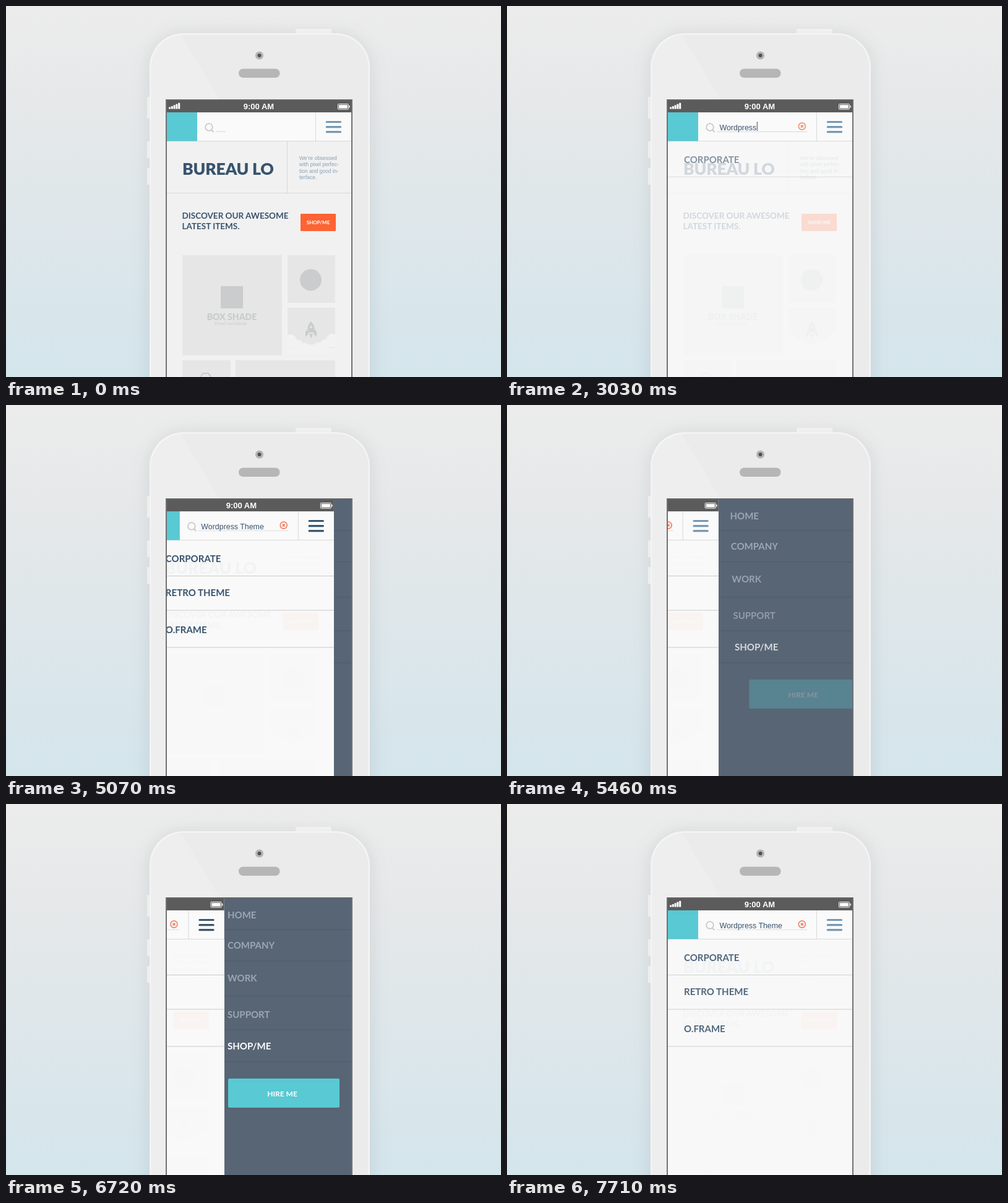
Animation, 800 px wide and 600 px high, one loop 7740 ms. Source, as an HTML page:

```html
<!DOCTYPE html>
<html lang="en">
<head>
<meta charset="utf-8">
<title>Mobile search and menu</title>
<style>
  html, body { margin: 0; width: 100%; height: 100%; overflow: hidden; }
  svg { display: block; width: 800px; height: 600px; }
  text { font-family: Lato, sans-serif; font-weight: 700; fill: #38536d; }
  .sans { font-family: "Liberation Sans", Arial, sans-serif; font-weight: 400; }
  .mid { text-anchor: middle; }
  .phone { filter: drop-shadow(0 2px 14px rgba(60, 70, 80, .13)); }
  .rule { stroke: #d9d9d9; }
  .tile { fill: #e6e6e6; }
  .mark { fill: #cacccd; }
  .title { font-size: 26.5px; font-weight: 900; letter-spacing: -.2px; }
  .lead { font-size: 13.5px; }
  .note { font-size: 8.5px; fill: #87a0b5; }
  .row text { font-size: 15px; }
  .row path { stroke: #c9cacb; }
  .item { font-size: 15px; fill: #9ba6b2; }
  .active { fill: #fff; }
  #line { transform-origin: 339px 0; }
  #bars { stroke: #7599b3; stroke-width: 3.2; stroke-linecap: round; }
</style>
</head>
<body>
<svg viewBox="0 0 800 600">
  <defs>
    <linearGradient id="sky" x2="0" y2="1">
      <stop stop-color="#ececec"/>
      <stop offset=".3" stop-color="#e5e8e9"/>
      <stop offset="1" stop-color="#d4e5ec"/>
    </linearGradient>
    <clipPath id="screen"><path d="M260 153h298v447H260z"/></clipPath>
    <clipPath id="sky-tile"><path d="M455 488h77v77h-77z"/></clipPath>
  </defs>

  <rect width="800" height="600" fill="url(#sky)"/>

  <g fill="#f8f8f8">
    <rect x="228" y="147" width="8" height="35" rx="1"/>
    <rect x="228" y="219" width="8" height="27" rx="1"/>
    <rect x="228" y="262" width="8" height="27" rx="1"/>
    <rect x="468" y="37" width="58" height="12" rx="3"/>
  </g>
  <rect class="phone" x="232" y="44" width="356" height="640" rx="55" fill="#f4f4f4"/>
  <rect x="234.5" y="46.5" width="351" height="640" rx="52.5" fill="#ebebeb"/>
  <path d="M283 47L345 151H259V600H235V99Q235 47 283 47" fill="#fff" opacity=".12"/>
  <circle cx="409.5" cy="80" r="6.6" fill="#b5b5b5"/>
  <circle cx="409.5" cy="80" r="3" fill="#505050"/>
  <rect x="376" y="101.5" width="66.5" height="14.5" rx="7.2" fill="#b6b6b6"/>

  <g clip-path="url(#screen)">
    <g id="menu">
      <path d="M260 153h298v447H260z" fill="#586575"/>
      <path d="M260 203h298m-298 51h298m-298 57h298m-298 54h298m-298 52h298" stroke="#4e5a6a"/>
      <text class="item" x="358" y="185">HOME</text>
      <text class="item" x="358" y="234.3">COMPANY</text>
      <text class="item" x="358" y="287.3">WORK</text>
      <text class="item" x="358" y="346">SUPPORT</text>
      <text class="item active" x="358" y="397.3">SHOP/ME</text>
      <g id="hire">
        <rect x="359" y="444" width="180" height="47" rx="2" fill="#59c9d3"/>
        <text class="mid active" x="446.5" y="472.5" font-size="12">HIRE ME</text>
      </g>
    </g>

    <g id="page">
      <path d="M260 153h298v447H260z" fill="#f1f1f1"/>
      <path d="M260 153h298v19H260z" fill="#5b5b5b"/>
      <path d="M263 163.500h3v3h-3zm3.800-1.500h3v4.500h-3zm3.800-1.700h3v6.200h-3zm3.800-1.700h3v7.900h-3zm3.800-1.800h3v9.700h-3z" fill="#fff"/>
      <text class="sans mid" x="408.500" y="167" font-size="13" style="font-weight:700;fill:#fff">9:00 AM</text>
      <rect x="536.500" y="158.500" width="17" height="8.500" rx="1" fill="none" stroke="#fff"/>
      <path d="M538 160h14v5.500h-14zM554.500 161h1.300v3.500h-1.300z" fill="#fff"/>

      <path d="M260 172h298v46.500H260z" fill="#fafafa"/>
      <path class="rule" d="M260 218.500h298M500.500 172v46"/>
      <path d="M260 172h49v46.500h-49z" fill="#59c9d3"/>
      <g fill="none" stroke="#c9c9c9" stroke-width="1.800">
        <circle cx="328" cy="196" r="5.800"/>
        <path d="M332 200.500l3.500 3.500"/>
      </g>
      <path id="line" d="M339 202.700h146v1.100H339z" fill="#cfcfcf"/>
      <text id="query" class="sans" x="343.500" y="201" font-size="12.400"></text>
      <path id="caret" d="M339.700 187h1.200v15h-1.200z" fill="#51667a"/>
      <g id="clear" fill="none" stroke="#ee6c49" stroke-width="1.400">
        <circle cx="476.800" cy="194.500" r="5.500"/>
        <path d="M474.800 192.500l4 4m0-4l-4 4"/>
      </g>
      <path id="bars" d="M518.300 187.500h22.200m-22.200 8.200h22.200m-22.200 8h22.200"/>

      <path class="rule" d="M260 302.500h298M454.500 219v83"/>
      <text class="title" x="285" y="272.500">BUREAU LO</text>
      <text class="sans note" y="249">
        <tspan x="474">We’re obsessed</tspan>
        <tspan x="474" dy="10.300">with pixel perfec-</tspan>
        <tspan x="474" dy="10.300">tion and good in-</tspan>
        <tspan x="474" dy="10.300">terface.</tspan>
      </text>
      <text class="lead" x="284.500" y="344.300">DISCOVER OUR AWESOME</text>
      <text class="lead" x="284.500" y="361">LATEST ITEMS.</text>
      <rect x="476" y="336" width="57" height="28" rx="1" fill="#fd6333"/>
      <text class="mid active" x="504.500" y="353" font-size="8">SHOP/ME</text>

      <path class="tile" d="M285 403h161v162H285zM455 403h77v77h-77zM455 488h77v77h-77zM285 573h78v27h-78zM371 573h161v27H371z"/>
      <g class="mark">
        <path d="M347 453h36v36h-36z"/>
        <text class="mid" x="365" y="507.500" font-size="14" style="font-weight:900;fill:inherit">BOX SHADE</text>
        <text class="mid" x="363" y="515.500" style="font:italic 6.500px 'Noto Serif',serif;fill:inherit">Travel worldwide</text>
        <circle cx="492.500" cy="443" r="17.500"/>
        <path d="M493 510q8 8 4.500 18h-9q-3.500-10 4.500-18M488 521l-4 6v8l5-5zM498 521l4 6v8l-5-5zM490 530h6l-3 8z"/>
        <path d="M313 600l3-4 2-3h9l3 3 2 4h-2l-4-5h-7l-4 5z"/>
      </g>
      <circle cx="493" cy="519" r="2" fill="#e6e6e6"/>
      <g clip-path="url(#sky-tile)" fill="#f2f2f2">
        <path d="M455 553h77v12h-77z"/>
        <circle cx="459" cy="542" r="11"/><circle cx="472" cy="548" r="8"/>
        <circle cx="483" cy="553" r="8"/><circle cx="494" cy="555" r="8"/>
        <circle cx="505" cy="552" r="8"/><circle cx="516" cy="547" r="8"/>
        <circle cx="528" cy="541" r="11"/>
      </g>

      <path id="veil" d="M260 219h298v381H260z" fill="#f9f9f9"/>
      <g class="row"><text x="286" y="253.500">CORPORATE</text><path d="M260 276.500h298"/></g>
      <g class="row"><text x="286" y="309">RETRO THEME</text><path d="M260 332h298"/></g>
      <g class="row"><text x="286" y="369">O.FRAME</text><path d="M260 392h298"/></g>
    </g>
  </g>
  <path d="M259 610V152h300v458" fill="none" stroke="#656565" stroke-width="1.800"/>
</svg>

<script>
const LOOP = 7740;
const IN_OUT = 'cubic-bezier(.65,0,.35,1)';
const OUT = 'cubic-bezier(.215,.61,.355,1)';
const $ = s => document.querySelector(s);
const tracks = [];

// Each key is [ms, value, easing to the next key].
function track(el, prop, ...keys) {
  const all = [[0, keys[0][1]], ...keys, [LOOP, keys.at(-1)[1]]];
  const frames = all.map(([ms, value, easing = 'linear']) => ({ offset: ms / LOOP, [prop]: value, easing }));
  const anim = el.animate(frames, { duration: LOOP, iterations: Infinity });
  anim.pause();
  tracks.push(anim);
}
const shift = x => `translateX(${x}px)`;

// Search field
track($('#line'), 'transform', [720, 'scaleX(.11)', IN_OUT], [1650, 'scaleX(1)']);
track($('#line'), 'opacity', [2700, 1], [3300, .7]);
track($('#caret'), 'opacity', [1110, 0], [1110, 1], [1920, 1], [1920, 0],
  [2250, 0], [2250, 1], [3480, 1], [3480, 0]);
track($('#clear'), 'opacity', [2850, 0], [3060, 1]);

// Results
track($('#veil'), 'opacity', [2640, 0, IN_OUT], [3240, .965]);
document.querySelectorAll('.row').forEach((row, i) => {
  const start = 2910 + i * 180;
  track(row, 'opacity', [start, 0, OUT], [start + 480, 1], [7709, 1], [7710, .88]);
});

// Drawer
const OPEN = shift(-220);
track($('#page'), 'transform', [4848, shift(0), IN_OUT], [5556, OPEN], [6567, OPEN, IN_OUT], [7200, shift(0)]);
const LIGHT = '#7599b3', DARK = '#38566f';
track($('#bars'), 'stroke', [4740, LIGHT], [4860, DARK], [5250, DARK], [5400, LIGHT],
  [6420, LIGHT], [6540, DARK], [7000, DARK], [7150, LIGHT]);

function enter(el, start, span) {
  track(el, 'transform', [start, shift(60), OUT], [start + span, shift(0)]);
  track(el, 'opacity', [start, 0], [start + span / 1.7, 1]);
}
document.querySelectorAll('.item').forEach((el, i) => enter(el, 5052 + i * 36, 600));
enter($('#hire'), 5340, 680);

// Typing
const PHRASE = 'Wordpress Theme', TYPE_AT = 2430, KEY_MS = 70;
const query = $('#query'), caret = $('#caret');
function type(t) {
  const count = Math.max(0, Math.min(PHRASE.length, Math.floor((t - TYPE_AT) / KEY_MS) + 1));
  const typed = PHRASE.slice(0, count);
  if (query.textContent === typed) return;
  query.textContent = typed;
  const x = count ? query.getComputedTextLength() + 4.5 : 0;
  caret.setAttribute('transform', `translate(${x} 0)`);
}

const begin = performance.now();
function draw() {
  const t = (performance.now() - begin) % LOOP;
  tracks.forEach(a => { a.currentTime = t; });
  type(t);
  requestAnimationFrame(draw);
}
draw();
</script>
</body>
</html>
```
